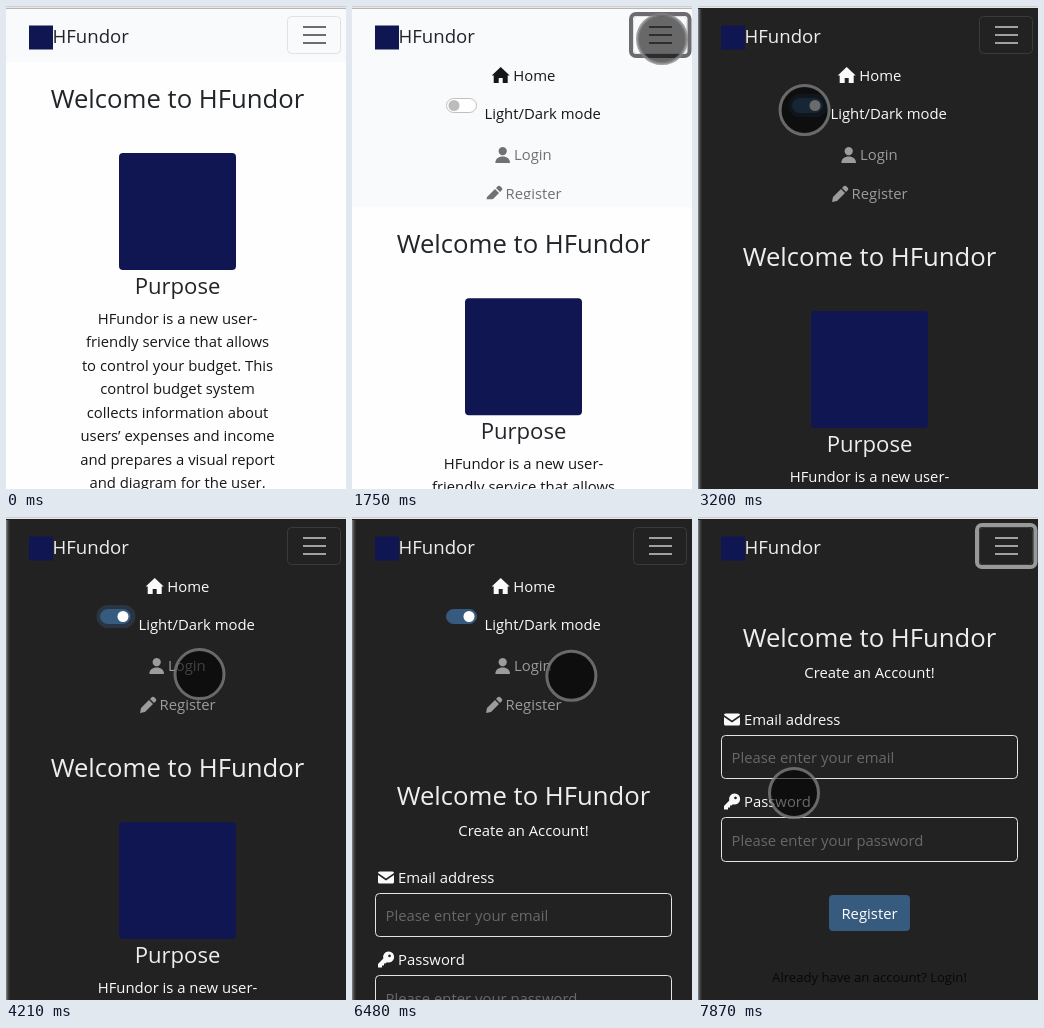
Animation of 340x483 px, one loop 8 s. Source, as an HTML page:

```html
<!DOCTYPE html>
<html lang="en">
<head>
<meta charset="utf-8">
<title>HFundor</title>
<style>
  :root {
    --dark: 0%;
    --page: color-mix(in srgb, #fefefe, #222 var(--dark));
    --nav: color-mix(in srgb, #f8fafc, #222 var(--dark));
    --ink: color-mix(in srgb, #212529, #eee var(--dark));
    --strong: color-mix(in srgb, #151617, #fafafa var(--dark));
    --link: color-mix(in srgb, #707172, #9c9c9c var(--dark));
    --hover: color-mix(in srgb, #444, #c8c8c8 var(--dark));
    --edge: color-mix(in srgb, #dfe1e3, #3a3a3a var(--dark));
    --bars: color-mix(in srgb, #6b6d6f, #a0a0a0 var(--dark));
    --focus: color-mix(in srgb, #6c6c70, #999 var(--dark));
    --rim: color-mix(in srgb, #b5b5b5, #222 var(--dark));
  }
  html, body { margin: 0; width: 100%; height: 100%; overflow: hidden; }
  svg { display: block; width: 340px; height: 483px; background: var(--page); }
  text { font: 450 14.85px "Open Sans", "Noto Sans", sans-serif; white-space: pre; }
  .mid { text-anchor: middle; }
  .h1 { font-size: 25.7px; }
  .h2 { font-size: 22.1px; }
  .brand { font-size: 18.6px; }
  .small { font-size: 13.1px; }
  .ink { fill: var(--ink); }
  .strong { fill: var(--strong); }
  .link { fill: var(--link); }
  .link.hover { fill: var(--hover); }
  .hint { fill: #686868; }
  .field { fill: #222; stroke: #e4e4e4; }
  .logo { fill: #0f1652; }
</style>
</head>
<body>
<svg viewBox="0 0 340 483">
  <defs>
    <clipPath id="menuClip"><rect id="menuBox" width="340" height="48"/></clipPath>
    <linearGradient id="shade">
      <stop stop-color="#8a8a8a"/><stop offset="1" stop-color="#222" stop-opacity="0"/>
    </linearGradient>
    <path id="house" d="M9 0 18 8.5H16V16H11V11H7V16H2V8.5H0Z"/>
    <path id="user" d="M8 0a4.1 4.1 0 1 1-.01 0zM.7 16c0-4.2 3-6.4 7.3-6.4s7.3 2.2 7.3 6.4z"/>
    <path id="pencil" d="M0 16l1-5 8-8 4 4-8 8zM10 2l2-2q1-.6 2 0l2 2q.6 1 0 2l-2 2z"/>
    <path id="mail" d="M0 3.5Q0 2 1.5 2h13Q16 2 16 3.5L8 9zM0 5.5 8 11 16 5.5v7q0 1.5-1.5 1.5h-13Q0 14 0 12.5z"/>
    <path id="key" fill-rule="evenodd" d="M10.5 0a5.5 5.5 0 1 1-1.6 10.7L7.5 12H6v2H4v2H0v-3.5l5.3-5.4A5.5 5.5 0 0 1 10.5 0zm1 3a1.4 1.4 0 1 0 .01 0z"/>
  </defs>

  <g id="content">
    <g id="home">
      <text class="ink mid h1" x="171.5" y="102">Welcome to HFundor</text>
      <rect class="logo" x="113" y="147" width="117" height="117" rx="4"/>
      <text class="ink mid h2" x="171.5" y="288">Purpose</text>
      <g id="purpose" class="strong mid"></g>
    </g>
    <g id="signup">
      <text class="ink mid h1" x="171.5" y="129.5">Welcome to HFundor</text>
      <text class="strong mid" x="171.5" y="161">Create an Account!</text>
      <g class="strong">
        <use href="#mail" x="26" y="194.5"/><text x="46" y="208">Email address</text>
        <use href="#key" x="26" y="276.5"/><text x="46" y="290">Password</text>
      </g>
      <rect class="field" x="23.5" y="218.5" width="296" height="43" rx="4"/>
      <text class="hint" x="33.5" y="246">Please enter your email</text>
      <rect class="field" x="23.5" y="300.5" width="296" height="44" rx="4"/>
      <text class="hint" x="33.5" y="329">Please enter your password</text>
      <rect x="131" y="378" width="81" height="36" rx="4" fill="#375a7f"/>
      <text class="mid" x="171.5" y="402" fill="#fff">Register</text>
      <text class="mid small" x="171.5" y="465" fill="#080808">Already have an account? Login!</text>
    </g>
  </g>

  <rect id="nav" width="340" height="56" fill="var(--nav)"/>
  <g clip-path="url(#menuClip)">
    <g class="strong">
      <use href="#house" x="139.7" y="61"/><text x="161.3" y="75">Home</text>
      <text x="132.5" y="113">Light/Dark mode</text>
    </g>
    <rect id="glow" x="92.5" y="90" width="35" height="19" rx="9.5" fill="none" stroke="#375a7f" stroke-opacity=".35" stroke-width="4"/>
    <rect id="track" x="94.5" y="92.5" width="30" height="14" rx="7"/>
    <circle id="knob" cy="99.5" r="5.5"/>
    <g class="link">
      <use href="#user" x="142.7" y="141"/><text x="162" y="154">Login</text>
    </g>
    <g id="register" class="link">
      <use href="#pencil" x="134" y="180"/><text x="153.5" y="193">Register</text>
    </g>
  </g>
  <rect class="logo" x="23" y="19.5" width="24" height="24"/>
  <text class="ink brand" x="46.5" y="37">HFundor</text>
  <rect x="281.5" y="10.5" width="53" height="37" rx="4" fill="none" stroke="var(--edge)"/>
  <path d="M297 21h23m-23 8h23m-23 8h23" fill="none" stroke="var(--bars)" stroke-width="2"/>
  <rect id="focus" x="279" y="8" width="58.5" height="42" rx="5" fill="none" stroke="var(--focus)" stroke-width="4"/>

  <rect id="side" y="2" width="5" height="481" fill="url(#shade)"/>
  <path d="M0 .5h340" stroke="#cfcfcf"/>
  <path d="M0 1.5h340" stroke="#e6e6e6"/>
  <path d="M0 2.5h340" stroke="var(--rim)"/>

  <g id="cursor">
    <circle r="24.5" fill="#000" fill-opacity=".58" stroke="#858585" stroke-opacity=".75" stroke-width="3"/>
    <circle id="press" r="18.5" fill="#ff0" fill-opacity=".5"/>
  </g>
</svg>
<script>
const LOOP = 8000, SWAP = 6060, MENU = 158;
const $ = id => document.getElementById(id);

const lines = ['HFundor is a new user-', 'friendly service that allows', 'to control your budget. This',
  'control budget system', 'collects information about', 'users’ expenses and income',
  'and prepares a visual report', 'and diagram for the user.'];
$('purpose').innerHTML = lines.map((s, i) =>
  `<text x="171.5" y="${317.8 + i * 23.45}">${s}</text>`).join('');

const path = [[0, 286, 515], [240, 286, 515], [560, 292, 300], [1000, 310, 33], [1850, 310, 33],
  [2205, 170, 70], [2590, 106.6, 104], [3790, 106.6, 104], [4210, 193.5, 157], [4490, 194.5, 186.5],
  [4620, 194.5, 186.5], [5060, 272, 115], [5460, 194.5, 186.5], [6270, 194.5, 186.5], [6700, 260, 110],
  [7110, 308, 36], [7400, 308, 36], [7870, 96, 276], [8000, 96, 276]];
const menu = [[1500, 0], [1610, 82], [1750, 145], [1850, MENU],
  [7350, MENU], [7460, 76], [7600, 13], [7700, 0]];
const dark = [[2950, 0], [3140, 100]];
const toggle = [[2920, 0], [3060, 1]];
const focus = [[1400, 0], [1550, 1], [2850, 1], [2990, 0], [7240, 0], [7390, 1]];
const clicks = [1400, 2850, 5920, 7240];

// Monotone cubic interpolation: smooth through keys, still on holds.
function at(keys, t, k = 1) {
  const last = keys.length - 1;
  if (t <= keys[0][0]) return keys[0][k];
  if (t >= keys[last][0]) return keys[last][k];
  const i = keys.findIndex(key => key[0] > t) - 1;
  const slope = j => j < 0 || j >= last ? 0 : (keys[j + 1][k] - keys[j][k]) / (keys[j + 1][0] - keys[j][0]);
  const tangent = j => {
    const a = slope(j - 1), b = slope(j);
    return a * b > 0 ? 2 * a * b / (a + b) : 0;
  };
  const span = keys[i + 1][0] - keys[i][0], p = (t - keys[i][0]) / span, q = 1 - p;
  return keys[i][k] * (1 + 2 * p) * q * q + keys[i + 1][k] * p * p * (3 - 2 * p)
    + span * p * q * (tangent(i) * q - tangent(i + 1) * p);
}

const set = (id, attrs) => {
  for (const name in attrs) $(id).setAttribute(name, attrs[name]);
};
const mix = (a, b, p) => `color-mix(in srgb, ${a}, ${b} ${p * 100}%)`;

function render(t) {
  const x = at(path, t), y = at(path, t, 2);
  const open = at(menu, t), night = at(dark, t), on = at(toggle, t);
  document.documentElement.style.setProperty('--dark', night + '%');

  set('content', { transform: `translate(0 ${open})` });
  set('nav', { height: 56 + open });
  set('menuBox', { height: 48 + open });
  $('home').style.display = t < SWAP ? '' : 'none';
  $('signup').style.display = t < SWAP ? 'none' : '';

  $('track').style.fill = mix('#fff', '#375a7f', on);
  $('track').style.stroke = mix('#bfbfbf', '#375a7f', on);
  $('knob').style.fill = mix('#bcbcbc', '#fff', on);
  set('knob', { cx: 102 + 15 * on });
  set('glow', { opacity: t < SWAP ? on : 0 });

  const hovered = Math.abs(x - 172) < 45 && Math.abs(y - 188) < 16;
  $('register').classList.toggle('hover', hovered);
  set('focus', { opacity: at(focus, t) });
  set('side', { opacity: night / 100 });

  set('cursor', { transform: `translate(${x} ${y})` });
  set('press', { opacity: clicks.some(c => t >= c && t < c + 140) ? 1 : 0 });
}

const start = performance.now();
function tick() {
  render((performance.now() - start) % LOOP);
  requestAnimationFrame(tick);
}
tick();
</script>
</body>
</html>
```
